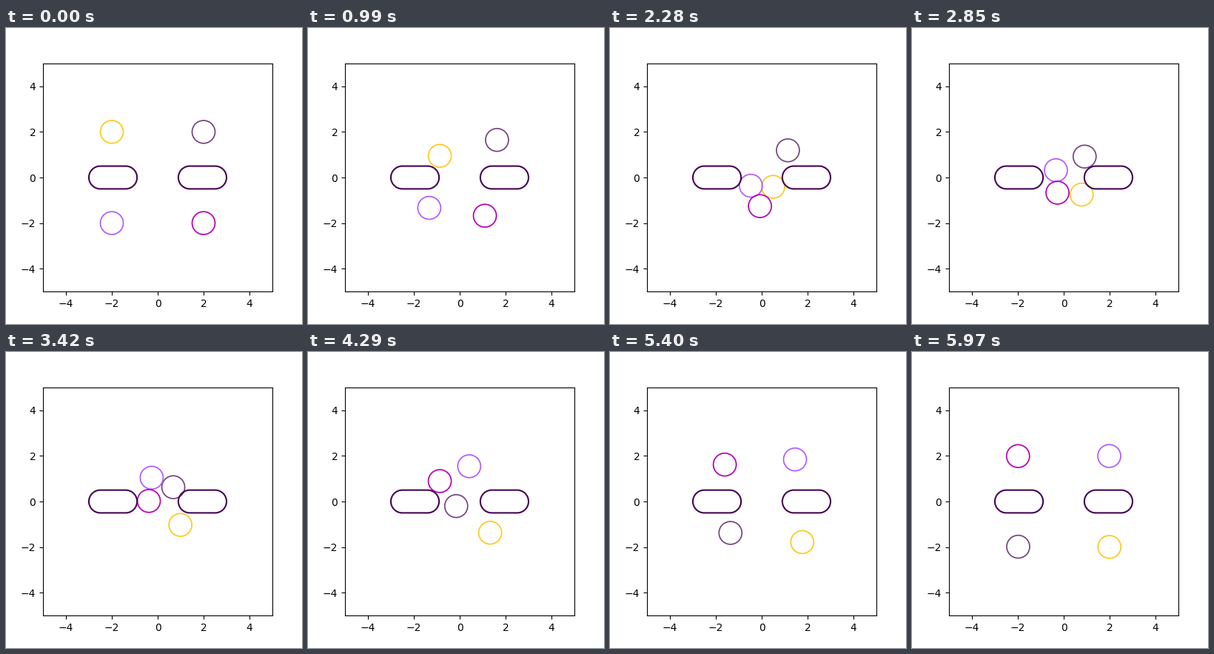
A matplotlib script that plays this animation: 400x400 px, repeating every 6000 ms.

```python
import numpy as np
import matplotlib.pyplot as plt
from matplotlib.animation import FuncAnimation
from matplotlib.patches import Circle, FancyBboxPatch

FRAMES = 200
STEPS = 10
RADIUS = 0.5

# Each robot crosses to the opposite corner, bending at a few
# points (step, x, y) to pass the rods and the other robots.
ROBOTS = [
    ("#ffc81e", (-2, 2),
     [(2, -.63, .73), (4, .62, -.53), (6, 1.05, -1.11)]),
    ("#744680", (2, 2),
     [(4, 1.1, 1.15), (6, .61, .54)]),
    ("#b05cff", (-2, -2),
     [(3, -.78, -.79), (4, -.4, -.26), (6, -.24, 1.26), (7, .32, 1.52)]),
    ("#b400b8", (2, -2),
     [(4, -.18, -1.22), (6, -.42, .23), (7, -.8, .83)]),
]


def make_path(start, bends):
    x, y = start
    return np.array([(0, x, y), *bends, (STEPS, -x, -y)]).T


def position(path, frame):
    step = STEPS * frame / (FRAMES - 0.5)
    t, x, y = path
    return np.interp(step, t, x), np.interp(step, t, y)


def rod(ax, x0, x1):
    """Outline at distance RADIUS around a horizontal segment."""
    style = f"round,pad=0,rounding_size={RADIUS}"
    ax.add_patch(FancyBboxPatch(
        (x0 - RADIUS, -RADIUS), x1 - x0 + 2 * RADIUS, 2 * RADIUS,
        boxstyle=style, fill=False, ec="#440154", lw=1.5, zorder=2))


def outline(a, b):
    """Points of a rod with round ends between a and b."""
    t = np.linspace(-np.pi / 2, np.pi / 2, 60)
    x = np.r_[b + RADIUS * np.cos(t), a - RADIUS * np.cos(t)]
    y = np.r_[RADIUS * np.sin(t), -RADIUS * np.sin(t)]
    return np.c_[x, y]


fig, ax = plt.subplots(figsize=(4, 4), dpi=100)
ax.set(xlim=(-5, 5), ylim=(-5, 5))
for side in (-1, 1):
    ax.add_patch(plt.Polygon(outline(*sorted((side * 1.4, side * 2.5))),
                             fill=False, ec="#440154", lw=1.5, zorder=2))

paths = [make_path(start, bends) for _, start, bends in ROBOTS]
circles = [ax.add_patch(Circle(start, RADIUS, fill=False, ec=color, lw=1.25))
           for color, start, _ in ROBOTS]


def update(frame):
    for circle, path in zip(circles, paths):
        circle.center = position(path, frame)
    return circles


anim = FuncAnimation(fig, update, frames=FRAMES, interval=30, repeat=True,
                     repeat_delay=0)
plt.show()
```
